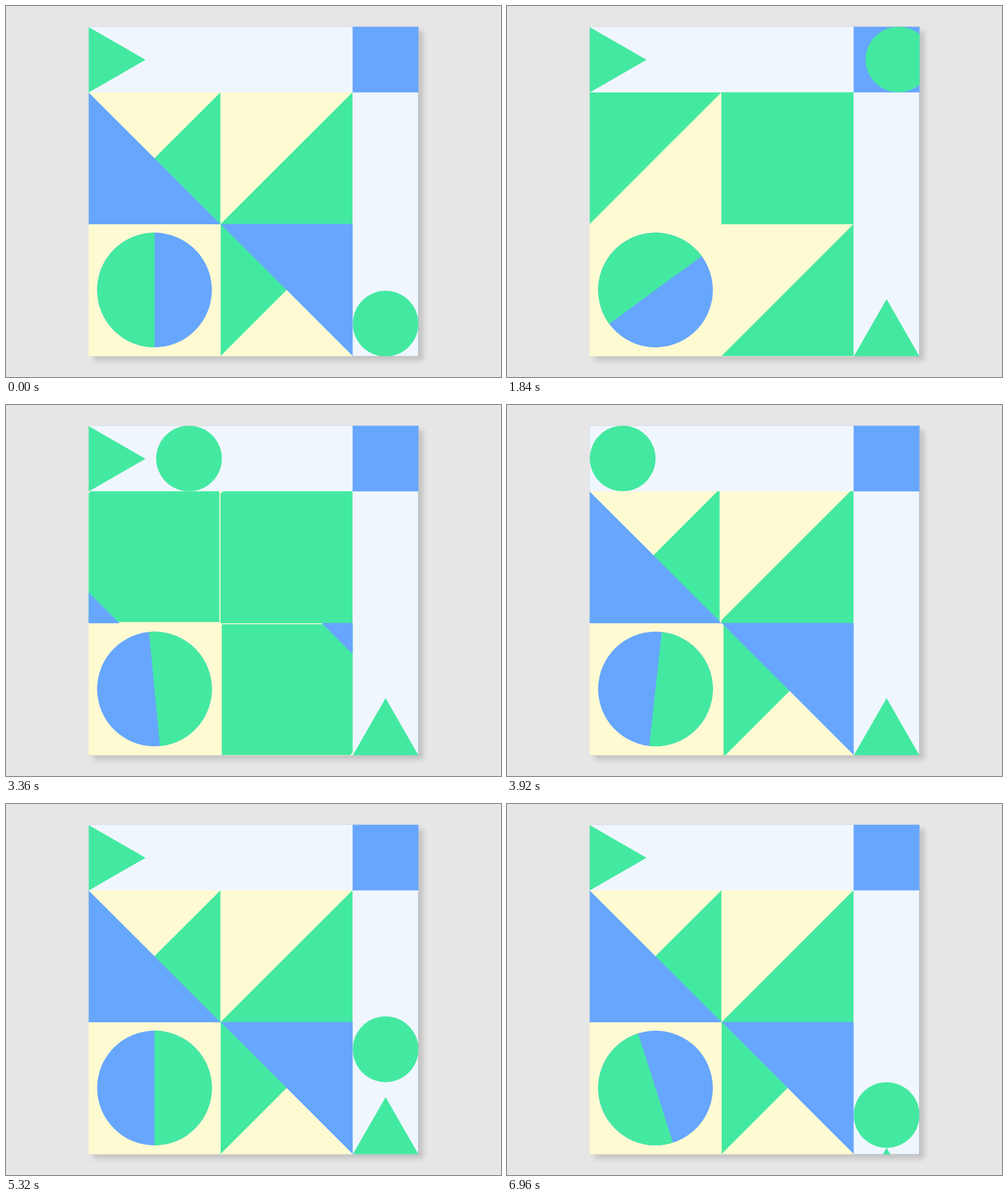
An HTML page for the animation above (7 s loop, 800x600 px).

```html
<!DOCTYPE html>
<html lang="en">
<head>
<meta charset="utf-8">
<title>Geometric tiles</title>
<style>
  html, body { margin: 0; width: 100%; height: 100%; overflow: hidden; background: #e6e6e6; }
  svg { display: block; width: 800px; height: 600px; }
  .green { fill: #44e9a1; }
  .blue { fill: #67a6fd; }
  .cream { fill: #fefad2; }
</style>
</head>
<body>
<svg viewBox="0 0 800 600">
  <defs>
    <filter id="soft" x="-10%" y="-10%" width="120%" height="120%"><feGaussianBlur stdDeviation="4"/></filter>
    <clipPath id="boardClip"><rect x="133.4" y="33.3" width="533.3" height="533.4"/></clipPath>
    <clipPath id="tileClip"><rect width="213.5" height="213.5"/></clipPath>
  </defs>
  <rect x="141.5" y="40.5" width="533" height="533" fill="#000" opacity=".15" filter="url(#soft)"/>
  <rect x="133.6" y="33.2" width="533.4" height="533.7" fill="#8a8a8a"/>
  <g clip-path="url(#boardClip)">
    <rect x="133" y="33" width="533.7" height="533.7" fill="#eff6fe"/>
    <rect class="blue" x="560.2" y="33.4" width="106.5" height="106.3"/>
    <path id="leftSpike" class="green" d="M133.5 34L225.5 87L133.5 140Z"/>
    <path id="floorSpike" class="green" d="M560.5 566.6L613.5 474L666.5 566.6Z"/>
    <circle id="ball" class="green" r="53.1"/>
    <rect class="cream" x="133" y="139.7" width="427.2" height="427"/>
    <g transform="translate(346.5 139.5)" clip-path="url(#tileClip)">
      <polygon id="corner" class="green"/>
    </g>
    <g transform="translate(133.2 139.4)" clip-path="url(#tileClip)">
      <polygon class="green pairGreen"/><polygon class="blue pairBlue"/>
    </g>
    <g transform="translate(560.3 566) rotate(180)" clip-path="url(#tileClip)">
      <polygon class="green pairGreen"/><polygon class="blue pairBlue"/>
    </g>
    <g id="wheel">
      <circle class="blue" r="92.7"/>
      <path class="green" d="M0 -92.7A92.7 92.7 0 0 1 0 92.7Z"/>
    </g>
  </g>
</svg>
<script>
const LOOP = 7000, STEPS = 168, SIDE = 213.5, HALF = SIDE / 2;
const $ = id => document.getElementById(id);
const clamp = x => Math.min(1, Math.max(0, x));
const span = (n, start, length) => clamp((n - start) / length);
const ease = x => x < .5 ? 4 * x ** 3 : 1 - 4 * (1 - x) ** 3;
const glide = (n, start, length) => ease(span(n, start, length));

// x counts in units of the first fall; each hop is half as long as the last.
function bounce(x) {
  if (x < 1) return Math.max(0, x) ** 2;
  for (let from = 1, width = 1, height = 1; width > .2; from += width, width /= 2, height /= 4) {
    if (x < from + width) {
      const u = (x - from) / width;
      return 1 - height * u * (1 - u);
    }
  }
  return 1;
}

// step, degrees, degrees per step
const turns = [
  [140, 0, 0], [168, 180, 18.3], [193, 652.3, 18.3], [212, 953.8, 11],
  [233, 1043.4, 2], [262, 1086.2, 0], [293, 1080, 0]
];

function wheelAngle(n) {
  const m = n < 140 ? n + STEPS : n;
  for (let i = 1; i < turns.length; i++) {
    const [a, p, v] = turns[i - 1], [b, q, w] = turns[i];
    if (m > b) continue;
    const h = b - a, u = (m - a) / h, s = 1 - u;
    return s * s * (1 + 2 * u) * p + u * u * (3 - 2 * u) * q + h * u * s * (s * v - u * w);
  }
  return 0;
}

function ballX(n) {
  if (n < 63) return 613.5 + 160 * span(n, 32, 22) ** 3.5;
  if (n < 97) return 773 - 493 * bounce((n - 63.3) / 9) - 93 * span(n, 80, 14) ** 2.5;
  return 187 + 426.5 * bounce((n - 97) / 9.5);
}

function ballY(n) {
  if (n < 117.6) return 513.7 - 427.2 * bounce(n / 9.9);
  return 86.5 + 334.5 * bounce((n - 117.6) / 10.8) + 92.7 * span(n, 147, 21) ** 2.5;
}

// Triangle whose right angle points down and right.
function lowerRight(slope, inset) {
  const far = SIDE - inset, near = inset - 2 * slope;
  return `${far},${far} ${far},${near} ${near},${far}`;
}

function greenPoints(n) {
  if (n >= 21 && n < 78) {
    const leg = SIDE * (1 + glide(n, 44, 20));
    return `0,0 ${leg},0 0,${leg}`;
  }
  const slope = n < 21 ? 0 : HALF * (1 - glide(n, 77.6, 20.4));
  return lowerRight(slope, slope * (1 - slope / HALF));
}

function bluePoints(n) {
  const shift = n < 70
    ? -HALF + HALF * glide(n, 0, 20) + SIDE * glide(n, 21.5, 20)
    : -SIDE + HALF * glide(n, 74, 18);
  const x = shift, y = SIDE - shift, leg = 2 * SIDE;
  return `${x},${y} ${x},${y - leg} ${x + leg},${y}`;
}

function setPoints(name, points) {
  document.querySelectorAll(name).forEach(el => el.setAttribute("points", points));
}

function draw(time) {
  const n = Math.floor(Math.floor((time % LOOP) / 40) * .95904 + .48);
  $("ball").setAttribute("cx", ballX(n));
  $("ball").setAttribute("cy", ballY(n));
  const left = 93 * span(n, 80, 14) ** 2.5 * (1 - glide(n, 99, 14));
  const floor = 92.7 * (n < 100 ? 1 - glide(n, 2, 14) : span(n, 147, 21) ** 2.5);
  $("leftSpike").setAttribute("transform", `translate(${-left} 0)`);
  $("floorSpike").setAttribute("transform", `translate(0 ${floor})`);
  $("wheel").setAttribute("transform", `translate(240 459.3) rotate(${wheelAngle(n)})`);
  setPoints("#corner", lowerRight(HALF * (glide(n, 21.3, 20) - glide(n, 77.6, 20)), 0));
  setPoints(".pairGreen", greenPoints(n));
  setPoints(".pairBlue", bluePoints(n));
}

const start = performance.now();
function tick() {
  draw(performance.now() - start);
  requestAnimationFrame(tick);
}
tick();
</script>
</body>
</html>
```
